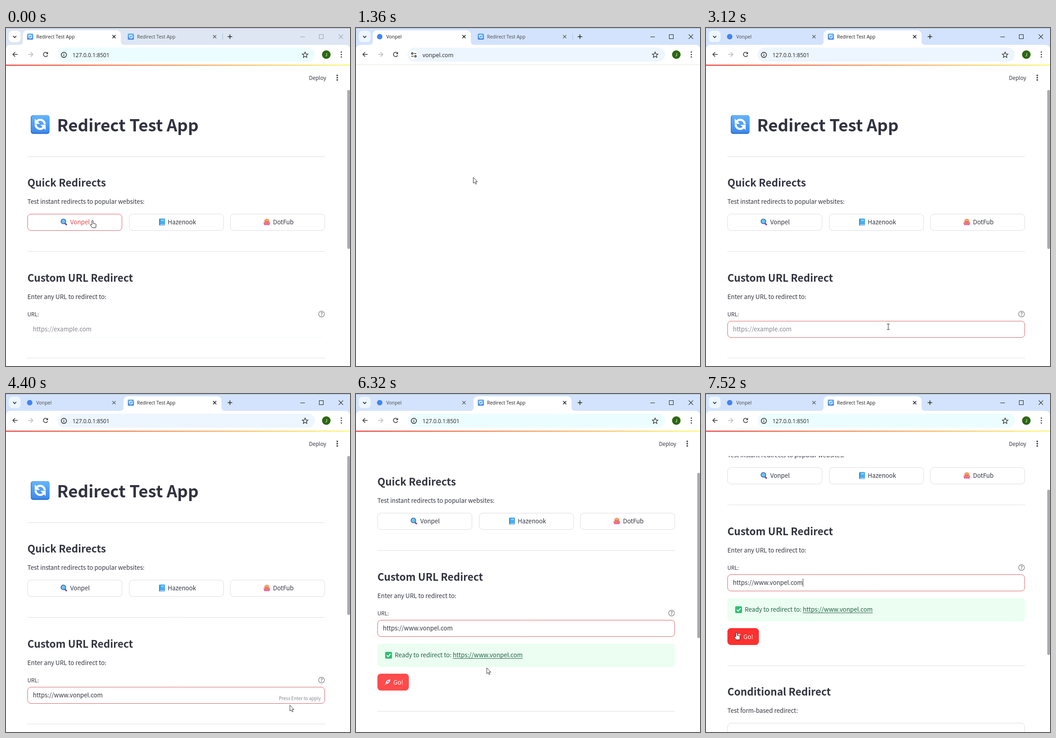
Write an HTML page with a canvas that moves like this. It is 755x742 px and loops after 7600 ms.

```html
<!DOCTYPE html>
<html lang="en">
<head>
<meta charset="utf-8">
<title>Redirect Test App</title>
<style>
  html, body { margin: 0; width: 100%; height: 100%; overflow: hidden; background: #fff; }
  canvas { display: block; }
</style>
</head>
<body>
<canvas id="stage" width="755" height="742"></canvas>
<script>
const c = document.getElementById('stage').getContext('2d');
const LOOP = 7600, STEP = 80;
const PAGE = '"Noto Sans CJK JP", "Noto Sans CJK SC", "Noto Sans CJK", "Noto Sans", sans-serif';
const UI = '"Open Sans", "Noto Sans", sans-serif';
const INK = '#31333f', DARK = '#1f1f1f', RED = '#e0474c', EDGE = '#d9646a', BODY = 13.28;
const SITE = 'vonpel.com', URL_TEXT = 'https://www.' + SITE;
const BUTTONS = [
  { x: 47, label: 'Vonpel', tx: 141, icon: magnifier },
  { x: 270, label: 'Hazenook', tx: 355, icon: book },
  { x: 492, label: 'DotFub', tx: 586, icon: octopus },
];
const MOUSE = [
  [0, 190, 423], [480, 190, 423], [720, 221, 468], [1120, 221, 468], [1760, 336, 25],
  [2160, 336, 25], [2800, 400, 656], [3760, 400, 656], [4320, 623, 683], [4720, 623, 683],
  [5040, 625, 673], [5760, 625, 673], [6240, 287, 601], [6640, 287, 601], [7200, 67, 524],
];
const SCROLL = [[6080, 0], [6320, 147], [6720, 247]];

// ---- helpers ----
function track(keys, t) {
  let i = 0;
  while (i < keys.length && keys[i][0] <= t) i++;
  if (i === 0) return keys[0].slice(1);
  if (i === keys.length) return keys[i - 1].slice(1);
  const a = keys[i - 1], b = keys[i], u = (t - a[0]) / (b[0] - a[0]), e = u * u * (3 - 2 * u);
  return a.slice(1).map((v, k) => v + (b[k + 1] - v) * e);
}

function text(s, x, y, size = BODY, color = INK, weight = 400, font = PAGE) {
  c.font = `${weight} ${size}px ${font}`;
  c.fillStyle = color;
  c.fillText(s, x, y);
  return x + c.measureText(s).width;
}

function box(x, y, w, h, r, fill, stroke) {
  c.beginPath();
  c.roundRect(x, y, w, h, r);
  if (fill) { c.fillStyle = fill; c.fill(); }
  if (stroke) { c.strokeStyle = stroke; c.lineWidth = 1; c.stroke(); }
}

function line(color, width, ...p) {
  c.beginPath();
  for (let i = 0; i < p.length; i += 2) c.lineTo(p[i], p[i + 1]);
  c.strokeStyle = color;
  c.lineWidth = width;
  c.stroke();
}

function ring(x, y, r, color, width, from = 0, to = 2 * Math.PI) {
  c.beginPath();
  c.arc(x, y, r, from, to);
  c.strokeStyle = color;
  c.lineWidth = width;
  c.stroke();
}

function disc(x, y, r, color) {
  c.beginPath();
  c.arc(x, y, r, 0, 7);
  c.fillStyle = color;
  c.fill();
}

function shape(d, x, y, fill, stroke) {
  const p = new Path2D(d);
  c.save();
  c.translate(x, y);
  if (fill) { c.fillStyle = fill; c.fill(p); }
  if (stroke) { c.strokeStyle = stroke; c.lineWidth = 1; c.stroke(p); }
  c.restore();
}

function cross(x, y, r, color, width = 1.3) {
  line(color, width, x - r, y - r, x + r, y + r);
  line(color, width, x + r, y - r, x - r, y + r);
}

const inside = (x, y, bx, by, w, h) => x >= bx && x <= bx + w && y >= by && y <= by + h;
const rule = y => line('#dedfe3', 1, 47, y + .5, 700, y + .5);
const heading = (s, y) => text(s, 47, y, 22.4, INK, 600);

// ---- small pictures ----
function refresh(x, y, s) {
  c.save();
  c.translate(x, y);
  c.scale(s / 41, s / 41);
  const g = c.createLinearGradient(0, 0, 0, 41);
  g.addColorStop(0, '#62b5fd');
  g.addColorStop(1, '#3b86ee');
  box(0, 0, 41, 41, 5, '#2f6fc4');
  box(1.5, .5, 39, 38, 4.5, g);
  ring(20.5, 20, 10, '#fff', 4.6, -2.4, 0);
  ring(20.5, 20, 10, '#fff', 4.6, .74, Math.PI);
  shape('M8.5 7.5V19H20z', 0, 0, '#fff');
  shape('M32.5 32.5V21H21z', 0, 0, '#fff');
  c.restore();
}

function magnifier(y) {
  line('#7a4d9e', 3.2, 129.5, y + 3, 133.5, y + 6.5);
  disc(126, y - 1.5, 5.4, '#6cc4f2');
  ring(126, y - 1.5, 5.2, '#42659f', 1.6);
}

function book(y) {
  box(336, y - 7.5, 13, 15, 1.5, '#2f86d8');
  box(338, y - 7.5, 11, 13, 1, '#49aef2');
  box(340.5, y - 5, 6, 2.5, .5, '#9bd8fb');
  line('#e4eef8', 1.3, 338, y + 6, 348.5, y + 6);
}

function octopus(y) {
  for (const x of [567.5, 577.5]) disc(x, y + 2, 2.3, '#f0699a');
  for (const x of [568.5, 572.5, 576.5]) disc(x, y + 4.8, 2.2, '#ee5a8f');
  disc(572.5, y - 1.5, 5.9, '#f5a070');
  box(568, y + 1, 9, 4, 2, '#f2708f');
  disc(570.5, y - .5, .9, '#4a2635');
  disc(574.5, y - .5, .9, '#4a2635');
}

function rocket(y) {
  c.save();
  c.translate(69, y);
  c.rotate(Math.PI / 4);
  shape('M-4 1L0-2 4 1 4 5-4 5z', 0, 0, '#c23a63');
  shape('M0-9Q5-3 2.6 4H-2.6Q-5-3 0-9z', 0, 0, '#e3e3ea');
  disc(0, -2, 1.5, '#4a8fd8');
  shape('M-1.8 4.5H1.8L0 9z', 0, 0, '#ffc53d');
  c.restore();
}

function runner(x, y) {
  const g = '#a3a4aa';
  disc(x + 4, y - 7, 2, g);
  line(g, 1.6, x - 5, y - 2, x - 2, y - 5, x + 2, y - 4, x, y + 1, x + 4, y + 4, x + 3, y + 9);
  line(g, 1.6, x + 2, y - 4, x + 4, y - 1, x + 7, y - 1);
  line(g, 1.6, x, y + 1, x - 2, y + 5, x - 7, y + 5);
}

function pointer(kind, x, y) {
  if (kind === 'hand') {
    shape('M-1.4 9V1a1.4 1.4 0 0 1 2.8 0v5l5 1q1.6.4 1.4 2l-.8 6.5h-7.5l-4-5.5q-1-1.6.8-1.8z', x, y, '#fff', '#222');
  } else if (kind === 'beam') {
    line('#222', 1, x, y - 6, x, y + 6);
    line('#222', 1, x - 3, y - 6, x + 3, y - 6);
    line('#222', 1, x - 3, y + 6, x + 3, y + 6);
  } else {
    shape('M0 0V13L3 10.3 5.2 15 7.2 14.1 5 9.6H9z', x, y, '#fff', '#333');
  }
}

// ---- browser frame ----
function tab(x, title, active, icon) {
  if (active) {
    box(x, 5, 215, 40, 9, '#fff');
    shape('M-8 32Q0 32 0 24V32z', x, 5, '#fff');
    shape('M8 32Q0 32 0 24V32z', x + 215, 5, '#fff');
  }
  icon(x + 9, 12.5);
  text(title, x + 29.5, 23, 10.45, active ? DARK : '#474747', 400, UI);
  cross(x + 200, 19, 3.5, active ? DARK : '#555', active ? 1.6 : 1.3);
}

function browser(t) {
  const idle = t < 160, second = t >= 1840, loading = t >= 640 && t < 1200, away = t >= 640 && !second;
  const bar = idle ? '#dde6f2' : t >= 5040 && t < 5760 ? '#e0e3ff' : '#d3e3fd';
  const mint = t < 400 || t >= 5040;
  const favicon = (x, y) => refresh(x + .5, y, 13);
  const spinner = (x, y) => {
    const turn = t / 130 - 1.1;
    ring(x + 6.5, y + 6.5, 5.5, '#2459c4', 1.8, turn, turn + 2.3);
    disc(x + 5, y + 6.5, 3, '#39485f');
  };
  const spot = (x, y) => disc(x + 6, y + 6.5, 6, '#4285f4');

  c.fillStyle = bar;
  c.fillRect(0, 0, 755, 45);
  line('#aab5c5', 1, 0, .5, 755, .5);
  box(0, 37, 755, 43, [9, 9, 0, 0], '#fff');
  box(6, 6, 26, 25, 8, idle ? '#fff' : '#edf6ff');
  line(DARK, 1.6, 15.5, 17.5, 19, 21, 22.5, 17.5);

  const title = t < 640 ? 'Redirect Test App' : loading ? SITE : 'Vonpel';
  tab(37, title, !second, t < 640 ? favicon : loading ? spinner : spot);
  tab(258, 'Redirect Test App', second, favicon);
  if (!second) line('#a8c7e8', 1.2, 475.5, 12, 475.5, 26);
  line(DARK, 1.5, 486.5, 19, 496.5, 19);
  line(DARK, 1.5, 491.5, 14, 491.5, 24);

  const control = idle ? '#9a9fa6' : DARK;
  line(control, 1, 646, 19.5, 656, 19.5);
  c.strokeRect(687.5, 14.5, 9, 9);
  cross(735, 19, 4.8, control, 1.1);

  for (const [x, d, color] of [[20, 1, '#333'], [54, -1, '#b8b8b8']]) {
    line(color, 1.5, x + 5.5 * d, 58, x - 5 * d, 58);
    line(color, 1.5, x, 53, x - 5 * d, 58, x, 63);
  }
  if (loading) cross(87, 58, 4.2, '#333', 1.6);
  else {
    ring(87, 58, 4.8, '#333', 1.5, .4, 5.5);
    shape('M5.2-5.5V-.8H.5z', 87, 58, '#333');
  }

  box(113, 43, 565, 31, 15.5, mint ? '#ecfdff' : '#edf6ff');
  if (away) {
    disc(127, 59, 10, '#fff');
    ring(123.5, 56, 1.8, DARK, 1.4);
    line(DARK, 1.4, 127.5, 56, 132.5, 56);
    line(DARK, 1.4, 121.5, 62, 126.5, 62);
    ring(130.5, 62, 1.8, DARK, 1.4);
  } else {
    ring(127, 59, 5.7, DARK, 1.4);
    line(DARK, 1.4, 127, 58.3, 127, 62);
    line(DARK, 1.4, 127, 55.8, 127, 57.2);
  }
  text(away ? SITE : '127.0.0.1:8501', 146, 63.5, away ? 12.5 : 11.95, DARK, 400, UI);

  c.beginPath();
  for (let i = 0; i < 10; i++) {
    const a = i * Math.PI / 5 - Math.PI / 2, r = i % 2 ? 3 : 6.6;
    c.lineTo(656.5 + r * Math.cos(a), 59.3 + r * Math.sin(a));
  }
  c.closePath();
  c.strokeStyle = '#333';
  c.lineWidth = 1.3;
  c.stroke();
  disc(703, 58.3, 9.4, '#2c6812');
  text('J', 701, 62, 10, '#fff', 400, 'Lato, sans-serif');
  for (const y of [53, 58.3, 63.6]) disc(736, y, 1.4, '#333');
  line('#e8e8df', 1, 0, 80.5, 755, 80.5);
}

// ---- web page ----
function page(t, mx, my) {
  const [scroll] = track(SCROLL, t);
  const gap = t >= 560 && t < 1200 ? 15 : 0;
  const focused = t >= 2960, ready = t >= 5680;
  const typed = URL_TEXT.slice(0, Math.max(0, Math.floor((t - 3120) / 40)));
  let kind = 'arrow';

  c.save();
  c.beginPath();
  c.rect(0, 136, 755, 606);
  c.clip();
  c.translate(0, -scroll);
  const py = my + scroll;

  refresh(54.5, 191.5, 41);
  text('Redirect Test App', 112, 227, 36.4, INK, 700);
  rule(282);
  heading('Quick Redirects', 348);
  text('Test instant redirects to popular websites:', 47, 386);
  BUTTONS.forEach((b, i) => {
    const hover = inside(mx, py, b.x, 408, 208, 37);
    const hot = hover || (i === 0 && t < 1200);
    if (hover) kind = 'hand';
    box(b.x + .5, 408.5, 207, 36, 7.5, '#fff', hot ? EDGE : '#dcdde1');
    b.icon(426);
    text(b.label, b.tx, 431, BODY, hot ? RED : INK);
  });

  c.translate(0, gap);
  rule(490);
  heading('Custom URL Redirect', 557);
  text('Enter any URL to redirect to:', 47, 595);
  text('URL:', 47, 632.5, 11.6);
  ring(692.5, 628, 6.3, '#808289', 1.3);
  text('?', 689.9, 632, 10.5, '#777980', 700);

  if (inside(mx, py, 47, 643, 653, 37)) kind = 'beam';
  if (focused) box(47.5, 643.5, 652, 36, 7.5, '#fff', EDGE);
  else line(t < 400 ? '#e4fbf8' : '#eff0f2', 1, 58, 679.5, 694, 679.5);
  if (typed) text(typed, 59, 666);
  else text('https://example.com', 59, 666, BODY, '#84868f');
  if (focused && (t + 530) % 1000 < 500) {
    c.font = `400 ${BODY}px ${PAGE}`;
    const x = 59.5 + c.measureText(typed).width;
    line(INK, 1, x, 652, x, 670);
  }
  if (typed && t < 5440) text('Press Enter to apply', 599, 672, 9.95, '#84868f');

  if (ready) {
    const green = '#1f6040';
    box(47, 695, 653, 51, 7.5, '#ebfef1');
    box(64, 713, 15, 15, 2.5, '#2fc073');
    line('#fff', 2, 67.5, 720.5, 70.5, 723.5, 76, 717.5);
    const x = text('Ready to redirect to: ', 85, 725, BODY, green);
    const end = text(URL_TEXT, x, 725, BODY, green);
    line(green, 1, x, 727.5, end, 727.5);

    const over = inside(mx, py, 47, 761, 69, 37);
    if (over) kind = 'hand';
    box(47, 761, 69, 37, 7.5, over ? '#ff3030' : '#ff4b4b');
    rocket(779.5);
    text('Go!', 82, 784.5, BODY, '#fff');
  }
  c.translate(0, ready ? 119 : 0);
  rule(724);
  heading('Conditional Redirect', 790);
  text('Test form-based redirect:', 47, 828);
  box(47.5, 850.5, 652, 200, 7.5, null, '#dcdde1');
  c.restore();

  const g = c.createLinearGradient(0, 0, 755, 0);
  g.addColorStop(0, '#f04b4b');
  g.addColorStop(1, '#fffd80');
  c.fillStyle = g;
  c.fillRect(0, 80.5, 755, 2.5);
  if (t >= 5440 && !ready) {
    runner(590, 109);
    text('Stop', 615.5, 113.5, 11.6, '#a3a4aa');
  }
  text('Deploy', 665, 114, 11.6);
  for (const y of [104, 109, 114]) disc(727, y, 1.7, INK);
  const top = 136 + Math.max(0, scroll - 47) * .37;
  box(749, top, 6, ready ? 363 : gap ? 345 : 349, 3, '#aaaab0');
  return kind;
}

function draw(now) {
  const t = Math.floor(now % LOOP / STEP) * STEP;
  const [mx, my] = track(MOUSE, t);
  c.fillStyle = '#fff';
  c.fillRect(0, 0, 755, 742);
  browser(t);
  const blank = t >= 1200 && t < 2080;
  pointer(blank ? 'arrow' : page(t, mx, my), mx, my);
  requestAnimationFrame(draw);
}
requestAnimationFrame(draw);
</script>
</body>
</html>
```
